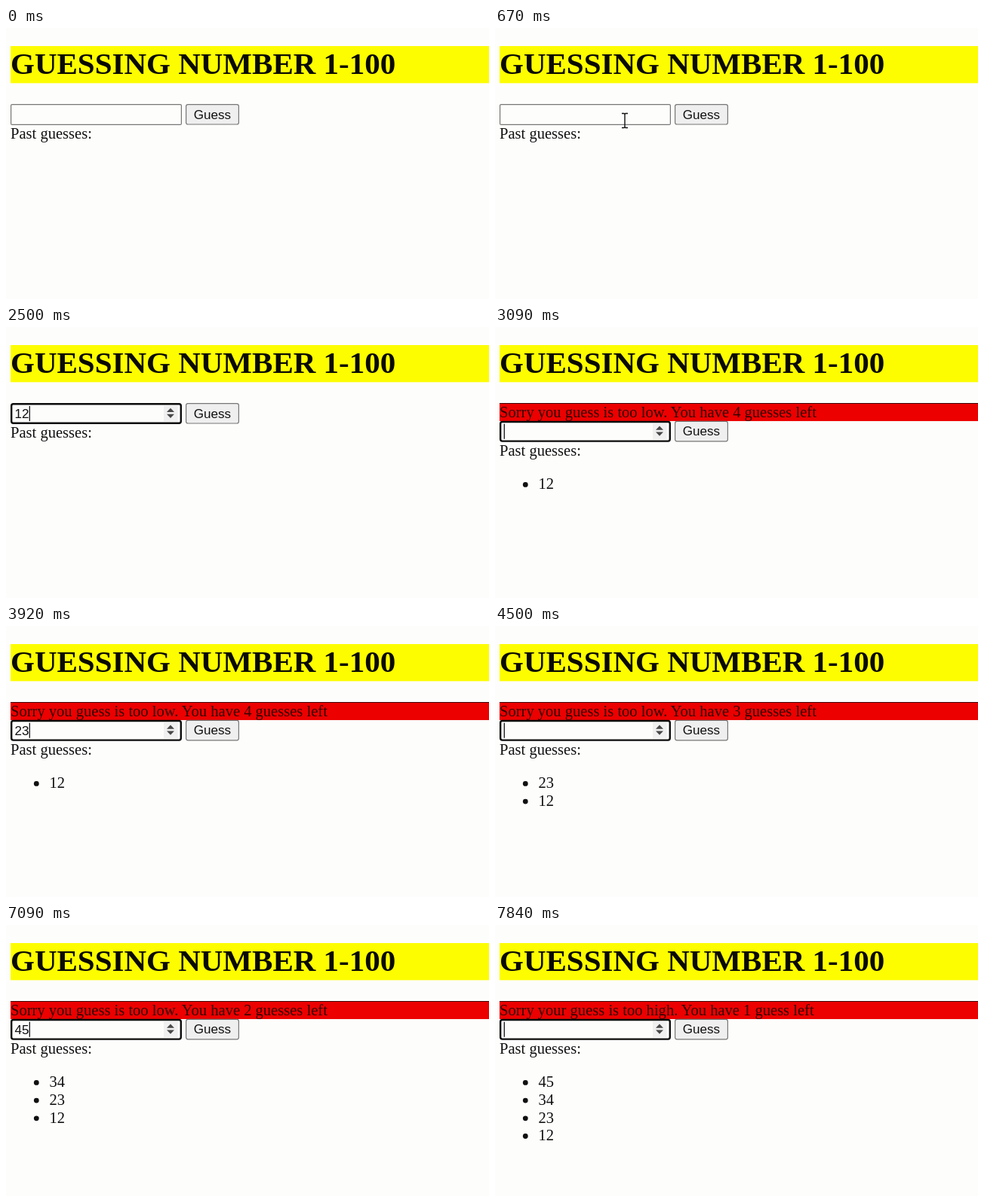
An HTML page for the animation above (8000 ms loop, 640 px wide and 360 px high).

```html
<!DOCTYPE html>
<html lang="en">
<head>
<meta charset="utf-8">
<title>Guessing number</title>
<style>
  html, body { margin: 0; height: 100%; overflow: hidden; background: #fdfdfc; }
  svg { display: block; width: 640px; height: 360px; }
  text { font: 20.55px "Liberation Serif", serif; fill: #101010; white-space: pre; }
  .title { font-size: 41px; font-weight: bold; fill: #0a0a00; }
  .ui { font: 17.07px "Liberation Sans", sans-serif; }
</style>
</head>
<body>
<svg viewBox="0 0 640 360">
  <rect x="6" y="24" width="634" height="49.3" fill="#fdfd00"/>
  <text class="title" x="6" y="61.3">GUESSING NUMBER 1-100</text>

  <g id="alert">
    <rect x="6" y="101" width="634" height="24" fill="#ec0000"/>
    <path d="M6 101.5H640" stroke="#400000"/>
    <text id="message" x="6" y="119.7" style="fill:#300000"></text>
  </g>

  <g id="form">
    <rect id="box" fill="#fdfdfc"/>
    <text id="value" class="ui" x="11.5" y="121"></text>
    <path id="caret" stroke="#000" stroke-width="1.2"/>
    <g id="spinner">
      <rect x="209" y="104.5" width="18.5" height="21" fill="#f0f0f0"/>
      <path d="M213 113L218 107.8L223 113ZM213 115.8L218 121L223 115.8Z" fill="#484848"/>
    </g>
    <rect x="238.6" y="101.6" width="69.8" height="26.4" rx="2.5" fill="#efefef" stroke="#767676" stroke-width="1.2"/>
    <text class="ui" x="273.3" y="120.7" text-anchor="middle">Guess</text>
    <text x="6" y="147">Past guesses:</text>
  </g>
  <g id="list"></g>

  <path id="beam" d="M-4 -9.5H-1L0 -8.5L1 -9.5H4M0 -8.5V8.5M-4 9.5H-1L0 8.5L1 9.5H4" fill="none" stroke="#111" stroke-width="1.4"/>
  <path id="arrow" d="M0 0V20L4.6 15.6L8 23L11 21.6L7.8 14.4H14Z" fill="#fff" stroke="#111"/>
</svg>
<script>
const LOOP = 8000, STEP = 83.4, FOCUS = 1000;
const $ = id => document.getElementById(id);
const show = (id, on) => $(id).setAttribute('visibility', on ? 'visible' : 'hidden');
const set = (id, attrs) => Object.entries(attrs).forEach(([k, v]) => $(id).setAttribute(k, v));
const ratio = (t, from, to) => Math.min(1, Math.max(0, (t - from) / (to - from)));
const mix = (a, b, k) => a + (b - a) * k;

// Times of first digit, second digit and submission
const rounds = [
  { guess: '12', keys: [2170, 2500], sent: 3090, reply: 'Sorry you guess is too low. You have 4 guesses left' },
  { guess: '23', keys: [3500, 3920], sent: 4500, reply: 'Sorry you guess is too low. You have 3 guesses left' },
  { guess: '34', keys: [4920, 5340], sent: 5920, reply: 'Sorry you guess is too low. You have 2 guesses left' },
  { guess: '45', keys: [6590, 7090], sent: 7670, reply: 'Sorry your guess is too high. You have 1 guess left' }
];

function drawPointer(time) {
  const t = Math.floor(time / STEP + 0.01) * STEP;
  const enter = 1 - (1 - ratio(t, 80, 660)) ** 2;
  const leave = ratio(t, 1080, 1660) ** 2;
  const x = mix(mix(634, 172, enter), -16, leave);
  const y = mix(mix(293, 123, enter), 258, leave);
  const inField = x > 6 && x < 233 && y > 101 && y < 129;
  const overLabel = x > 6 && x < 113 && y >= 129 && y < 152;
  const beam = inField || overLabel;
  const visible = time >= 90 && time < 1670;
  const transform = `translate(${x} ${y})`;
  set('beam', { transform });
  set('arrow', { transform });
  show('beam', visible && beam);
  show('arrow', visible && !beam);
}

function draw(t) {
  const done = rounds.filter(r => t >= r.sent);
  const now = rounds[done.length];
  const typed = now ? now.guess.slice(0, now.keys.filter(k => t >= k).length) : '';
  const focused = t >= FOCUS;

  show('alert', done.length > 0);
  $('message').textContent = done.length ? done[done.length - 1].reply : '';
  set('form', { transform: `translate(0 ${done.length ? 23.8 : 0})` });

  const w = focused ? 2.4 : 1.2;
  set('box', {
    x: 6 + w / 2, y: 101 + w / 2, width: 227 - w, height: 28 - w,
    rx: focused ? 2.5 : 1.5, stroke: focused ? '#0c0c0c' : '#767676', 'stroke-width': w
  });
  $('value').textContent = typed;
  const caretX = 12.3 + typed.length * 9.5;
  set('caret', { d: `M${caretX} 105V125` });
  show('caret', focused);
  show('spinner', t >= 750);

  $('list').innerHTML = done.reverse().map((r, i) => {
    const y = 215.2 + i * 23.7;
    return `<circle cx="40.3" cy="${y - 5.8}" r="3.4" fill="#101010"/><text x="57.5" y="${y}">${r.guess}</text>`;
  }).join('');
  drawPointer(t);
}

let start;
function tick(now) {
  start ??= now;
  draw((now - start) % LOOP);
  requestAnimationFrame(tick);
}
draw(0);
requestAnimationFrame(tick);
</script>
</body>
</html>
```
